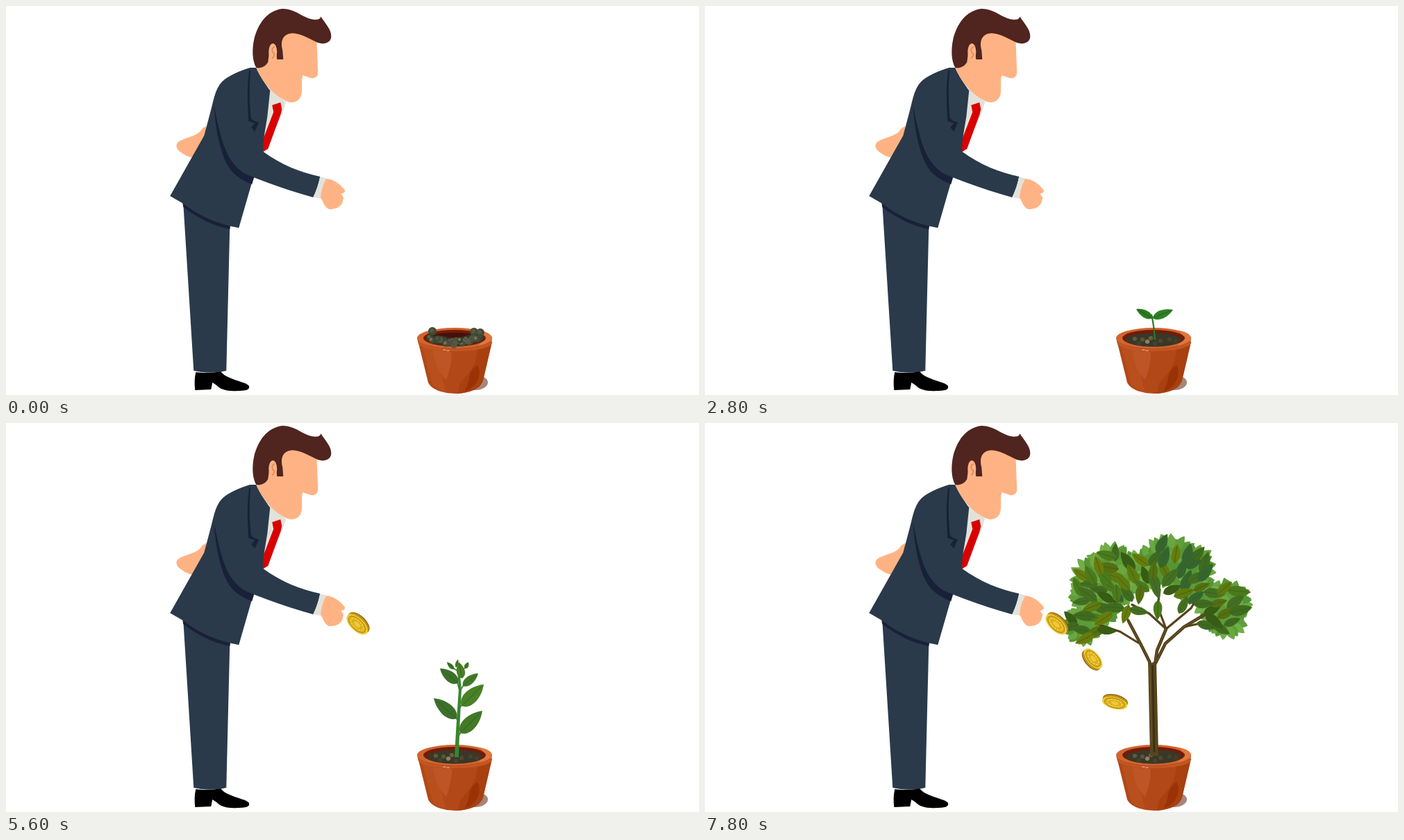
These frames come from a looping animation (998x561 px, 8000 ms). An HTML page:

```html
<!DOCTYPE html>
<html lang="en">
<head>
<meta charset="utf-8">
<title>Growing a plant with coins</title>
<style>
html, body { margin: 0; height: 100%; overflow: hidden; background: #fff; }
svg { display: block; width: 100vw; height: 100vh; }
.stage, .coin { visibility: hidden; }
.on { visibility: visible; }
</style>
</head>
<body>
<svg id="scene" viewBox="0 0 998 561"></svg>
<script>
const scene = document.getElementById('scene');
const SKIN = '#ffb384', SUIT = '#2a3a4a', NAVY = '#192039', SHIRT = '#e2e2db';

let seed = 11;
const rand = () => (seed = (seed * 16807) % 2147483647) / 2147483647;
const pick = list => list[Math.floor(rand() * list.length)];

const shape = (d, fill) => `<path d="${d}" fill="${fill}"/>`;
const line = (d, color, width) =>
  `<path d="${d}" fill="none" stroke="${color}" stroke-width="${width}" stroke-linecap="round" stroke-linejoin="round"/>`;
const oval = (x, y, rx, ry, fill, extra = '') =>
  `<ellipse cx="${x}" cy="${y}" rx="${rx}" ry="${ry}" fill="${fill}" ${extra}/>`;

// A leaf from its base (x, y) to its tip (tx, ty), w is its fullness.
function leaf(x, y, tx, ty, w, fill, rib) {
  const dx = tx - x, dy = ty - y, len = Math.hypot(dx, dy);
  const at = (k, side) =>
    `${(x + dx * k - dy / len * w * side).toFixed(1)},${(y + dy * k + dx / len * w * side).toFixed(1)}`;
  const body = shape(`M${x},${y}C${at(.12, 1)} ${at(.62, 1)} ${tx},${ty}C${at(.62, -1)} ${at(.12, -1)} ${x},${y}Z`, fill);
  return rib ? body + line(`M${x},${y}L${at(.88, 0)}`, rib, .8) : body;
}

const man = '<g transform="translate(-.7 0)">' + [
  shape('M289,173L283,177C278,188 259,189 249,196C243,201 247,208 254,212C262,218 270,220 274,217L288,196Z', SKIN),
  shape('M256,285C277,304 300,313 323,319L318,526C300,530 285,529 271,526Z', SUIT),
  shape('M255,284L256,290C276,306 300,317 323,322L324,316Z', NAVY),
  shape('M274,528C288,530 301,529 310,527C317,538 343,541 350,547C354,554 344,555 334,555C320,556 309,553 304,547L298,543L296,553L273,554C272,545 272,537 274,528Z', '#000'),
  shape('M380,119L404,138L399,154L372,212L366,205L377,150Z', SHIRT),
  shape('M384,143L396,139L398,149L396,157L378,206L368,212L371,192L386,153Z', '#d90000'),
  shape('M361,89L352,89C338,93 320,101 312,109C301,120 299,140 294,157L286,187L237,274L256,285C280,304 307,315 336,320L357,247C385,258 414,268 443,276C447,268 451,257 453,246C425,240 397,229 371,210C370,200 374,178 377,160L381,122C374,112 366,101 361,89Z', SUIT),
  shape('M300,143C306,170 312,205 326,224C335,237 345,243 358,247L355,257C336,250 323,240 315,220C307,200 302,172 300,143Z', NAVY),
  shape('M351,93C347,118 349,145 350,166L359,169L354,175L359,181L365,168C357,166 352,163 353,156C351,134 351,114 353,93Z', NAVY),
  shape('M453,246L463,249C458,259 454,268 456,278L443,276C447,268 451,257 453,246Z', SHIRT),
  shape('M462,249C473,250 482,257 489,266L488,269L483,271L487,276L485,284C481,291 475,293 466,293C459,290 458,283 454,277C454,267 458,256 462,249Z', SKIN),
  shape('M361,89L380,58L399,32L448,46L450,96C450,103 443,106 437,103L428,100C425,110 429,122 425,131C421,139 412,141 404,137C386,128 371,112 361,89Z', SKIN),
  shape('M361,89C355,78 355,62 358,48C363,27 376,7 398,4C414,3 425,14 437,18C446,21 454,20 454,15C460,25 470,34 469,45C468,53 459,56 450,53C437,47 420,36 408,40C398,43 396,53 399,64L400,77L391,77L389,58L381,58L378,81C374,88 367,90 361,89Z', '#50241f'),
  oval(385, 66, 6, 12, SKIN),
  line('M387,59C383,61 383,66 387,69C387,72 386,74 384,75', '#d98d5c', 1.6)
].join('') + '</g>';

const pot = [
  oval(675, 543, 19, 11, '#a4877b'),
  shape('M593,482L608,543C614,555 632,559 650,559C668,558 682,552 687,540L700,484Z', '#b24817'),
  shape('M599,490L614,546C619,552 626,555 634,557L617,495Z', '#b94f1c'),
  shape('M615,496C617,515 624,530 634,539C640,523 642,510 642,499Z', '#bd5526'),
  shape('M679,493C678,523 662,533 654,544C652,551 652,555 650,559C674,557 684,550 687,540L700,484Z', '#a84010'),
  shape('M679,518C685,528 681,545 667,553L660,556C670,542 663,527 679,518Z', '#9a3205'),
  oval(646, 479, 54, 15, '#d2642d'),
  shape('M592,479C596,500 696,500 700,479L699,488C686,501 609,501 594,488Z', '#c25724'),
  shape('M680,490Q696,487 700,479Q698,470 681,468Q694,476 680,490Z', '#e0783c'),
  oval(646, 479, 45, 12, '#701c0a'),
  line('M630,496h3M635,497h3', '#f3c4a8', 1.2)
].join('');

const soil = oval(646, 481.5, 40, 10, '#3b3727') +
  [[619, 480, '#5c5a43'], [630, 481, '#58553c'], [637, 484, '#89835f'], [642, 479, '#65603f'],
   [656, 483, '#494a34'], [669, 481, '#46432f'], [648, 487, '#45432f'], [678, 483, '#42402d'], [625, 486, '#424130']]
    .map(([x, y, c]) => oval(x, y, 3.2, 3, c)).join('');

// Loose heap of earth and moss, higher at the two sides.
function heap() {
  let out = oval(646, 480, 39, 9, '#481009') + shape('M608,477Q625,471 646,482Q670,470 687,475Q683,490 646,491Q612,489 608,477Z', '#33362a');
  for (let i = 0; i < 26; i++) {
    const k = (i * 11 % 26) / 25, x = 610 + k * 73;
    const y = 483 - Math.abs(k - .45) * 11 + rand() * 7 * (1 - Math.abs(k - .5));
    out += oval(x, y, 4.6, 4.6, pick(['#444a36', '#3a4030', '#555a40', '#4b4c39'])) +
      oval(x - 1, y - 1, 2.3, 2.3, pick(['#5b6148', '#73745a', '#4e5340']));
  }
  return out + [[614, 469], [674, 470], [683, 471]].map(([x, y]) => oval(x, y, 6, 6, '#434a35') + oval(x - 1, y - 1, 3, 3, '#545b42')).join('');
}

const sprout = soil +
  line('M655,481C658,470 660,456 651,456C647,456 645,459 642,463', '#4d9526', 3.5) +
  oval(640, 467, 9, 14, '#4f9526', 'transform="rotate(28 640 467)"') +
  oval(637.5, 466, 5.5, 11, '#70b239', 'transform="rotate(28 637.5 466)"') +
  line('M633,478Q642,470 645,457', '#3f7d1d', 1);

const seedling = soil +
  line('M648,481Q647,465 644,449', '#2d7a20', 2.2) +
  leaf(644, 450, 621, 437, 7, '#2d7a22', '#1d5b17') +
  leaf(645, 450, 674, 438, 8, '#2f8124', '#1d5b17') +
  leaf(644, 452, 643, 444, 2, '#2d7a22');

const youngPlant = soil +
  shape('M646,482Q648,440 652,384L650,355L653,355L656,384Q653,440 652,482Z', '#38852d') +
  line('M652,432L648,425M652,451L655,446M654,410L657,406M653,386L650,374M654,386L659,378M652,368L656,366M651,358L645,354M653,360L661,353', '#38852d', 1.6) +
  [[649, 426, 616, 397, 12], [654, 447, 686, 415, 13], [656, 408, 688, 377, 13], [651, 375, 625, 354, 10],
   [658, 379, 680, 361, 8], [657, 368, 652, 345, 8], [645, 355, 635, 345, 4], [661, 354, 666, 345, 4], [648, 352, 651, 341, 3]]
    .map(([x, y, tx, ty, w], i) => leaf(x, y, tx, ty, w, ['#3c702b', '#427a28', '#4a8126'][i % 3], '#285e20')).join('');

// Crown lobes: centre x, centre y, radius.
const lobes = [[585, 210, 38], [563, 226, 37], [552, 246, 28], [544, 291, 30], [570, 266, 30], [594, 238, 28],
  [622, 215, 31], [645, 206, 32], [670, 199, 41], [699, 209, 37], [703, 232, 31], [732, 256, 30], [755, 258, 33], [750, 279, 33]];

function tree() {
  let light = '', dark = '';
  const taken = [];
  for (const [cx, cy, r] of lobes) {
    light += oval(cx, cy, r * .8, r * .8, '#5d9b38');
    for (let i = 0; i < 22; i++) {
      const a = i / 22 * 2 * Math.PI, tipA = a + (rand() - .5) * .5, tipR = r * (.95 + rand() * .14);
      light += leaf(cx + Math.cos(a) * r * .45, cy + Math.sin(a) * r * .45,
        cx + Math.cos(tipA) * tipR, cy + Math.sin(tipA) * tipR, 8, pick(['#5f9f39', '#6aa741', '#569534', '#72ae48']));
    }
  }
  const addDark = (x, y, a, len) => {
    const dx = Math.cos(a) * len / 2, dy = Math.sin(a) * len / 2;
    dark += leaf(x - dx, y - dy, x + dx, y + dy, len * .3,
      pick(['#3f6b20', '#5f7a0e', '#4b7a1c', '#35662f', '#687c0c', '#446f22', '#385c14', '#556f12']), '#3a5c1c');
  };
  for (let i = 0; i < 900; i++) {
    const [cx, cy, r] = pick(lobes), a = rand() * 2 * Math.PI, d = Math.sqrt(rand()) * r * .68;
    const x = cx + Math.cos(a) * d, y = cy + Math.sin(a) * d;
    if (taken.some(p => Math.hypot(p[0] - x, p[1] - y) < 13)) continue;
    taken.push([x, y]);
    addDark(x, y, Math.atan2(y - 290, x - 645) + (rand() - .5) * 1.5, 25 + rand() * 9);
  }
  [[652, 270, 1.6], [606, 276, 1.9], [626, 248, 1.7], [625, 271, .2], [689, 262, -1.1], [650, 240, 1.3], [593, 247, 1.5], [673, 240, -.4], [579, 299, .1], [722, 292, .3]]
    .forEach(([x, y, a]) => addDark(x, y, a, 28));

  const twigs = 'M610,286L598,264L580,250M624,317L598,301L565,290M664,297L640,275L615,262M664,297L652,265L655,240M664,297L700,267L712,246M690,294L718,288';
  const limbs = 'M640.5,345L627,318L610,286M648,348L651,328L664,297M649,346L663,318L690,294L740,264';
  const trunk = shape('M641,480L638,343L643,346L650,343L653,480Z', '#55451d') +
    line('M644.5,350L647,474', '#392b11', 2.2) + line('M640.5,350L643,460', '#6d5829', 1.2);
  return soil + light + line(twigs, '#56421c', 3.2) + line(limbs, '#503d19', 4.6) +
    line(limbs, '#6c5528', 1.2) + trunk + dark;
}

// The face is shifted against the edge by ey to show thickness.
function coin([x, y, rx, ry, turn, ey]) {
  return `<g class="coin" transform="translate(${x} ${y}) rotate(${turn})">` +
    oval(0, -ey, rx, ry, '#8f630c') + oval(0, -ey / 3, rx, ry, '#c2921a') +
    oval(0, ey, rx, ry, '#f0cd3a') +
    oval(0, ey, rx * .82, ry * .8, '#dcb01c', 'stroke="#ab800f" stroke-width=".9"') +
    oval(0, ey, rx * .6, ry * .55, 'none', 'stroke="#f6de5c" stroke-width="1.2" stroke-dasharray="3 1.5"') +
    oval(0, ey, rx * .3, ry * .3, '#edca3a') + '</g>';
}
const coins = [[507, 289, 19, 9.5, 44, 2], [557.5, 341, 17.5, 9, 50, -2], [590.5, 402, 18.5, 8.5, 14, 2], [625, 462.5, 18, 8.5, 14, -1.5]];

const stages = [heap(), sprout, seedling, youngPlant, tree()];
scene.innerHTML = man + pot +
  stages.map(s => `<g class="stage">${s}</g>`).join('') + coins.map(coin).join('');

const stageNodes = scene.querySelectorAll('.stage'), coinNodes = scene.querySelectorAll('.coin');
const LOOP = 8000, STEP = 200, REST = 1000, CYCLE = 1800;

function draw() {
  const t = performance.now() % LOOP + CYCLE - REST;
  const stage = Math.floor(t / CYCLE);
  const count = Math.floor((t % CYCLE - REST) / STEP) + 1;
  stageNodes.forEach((node, i) => node.classList.toggle('on', i === stage));
  coinNodes.forEach((node, i) => node.classList.toggle('on', i < count));
  requestAnimationFrame(draw);
}
draw();
</script>
</body>
</html>
```
